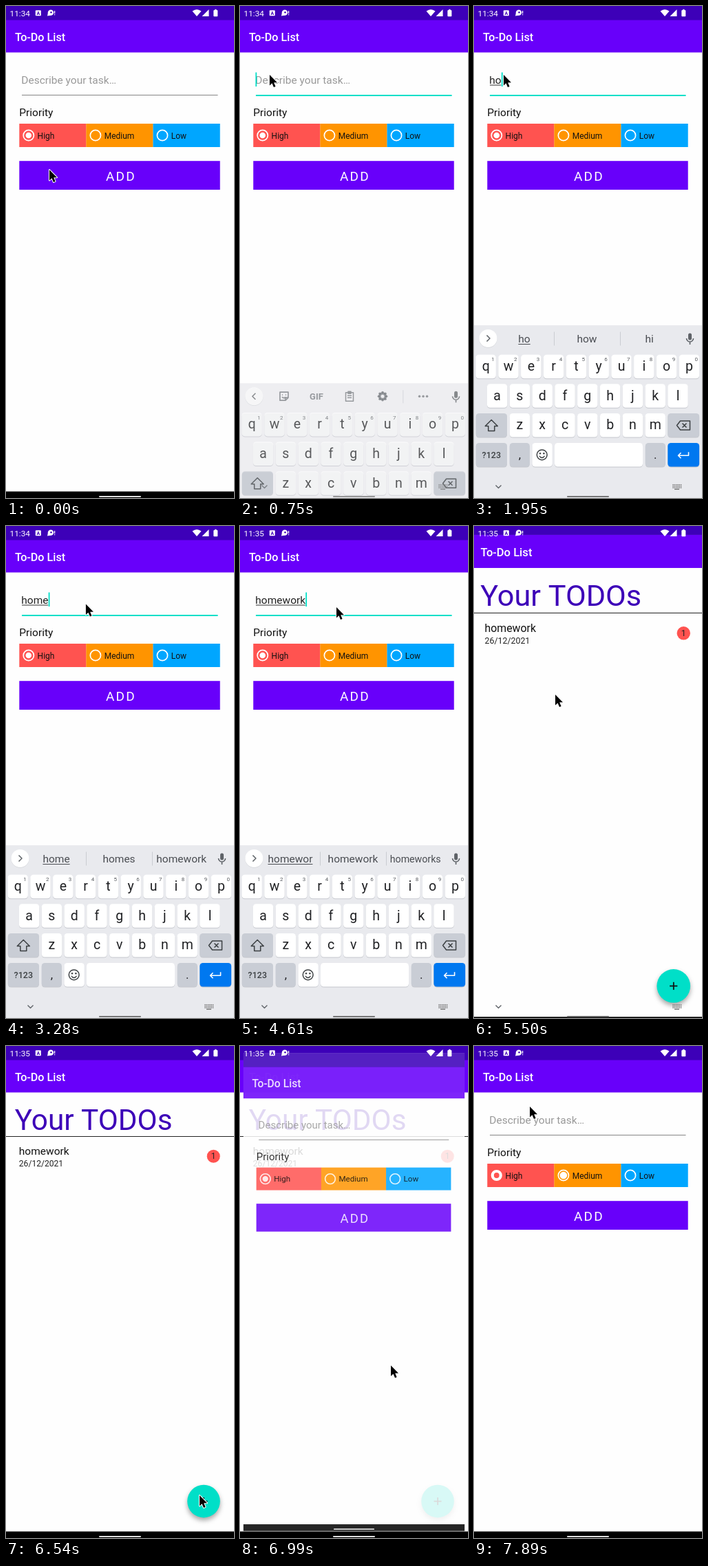
Recreate the animation shown at these times as an HTML page with a canvas. Size 331 by 715 pixels, loop 8 s.

```html
<!DOCTYPE html>
<html lang="en">
<head>
<meta charset="utf-8">
<title>To-Do List</title>
<style>
html, body { margin: 0; width: 100%; height: 100%; overflow: hidden; background: #fefefe; }
canvas { display: block; width: 331px; height: 715px; }
</style>
</head>
<body>
<canvas id="stage"></canvas>
<script>
const W = 331, H = 715, LOOP = 8000, TICK = 148.85;
const PURPLE = '#6800fa', DARK = '#3d00b8', RED = '#ff5350', ORANGE = '#ff9400',
      BLUE = '#00a6ff', TEAL = '#00dfc8', INK = '#202124', GREY = '#5f6368';
const canvas = document.getElementById('stage');
const dpr = window.devicePixelRatio || 1;
canvas.width = W * dpr;
canvas.height = H * dpr;
const ctx = canvas.getContext('2d');

// ---- helpers ----
function rect(x, y, w, h, color) {
  ctx.fillStyle = color;
  ctx.fillRect(x, y, w, h);
}
function round(x, y, w, h, r, color) {
  ctx.fillStyle = color;
  ctx.beginPath();
  ctx.roundRect(x, y, w, h, r);
  ctx.fill();
}
function disc(x, y, r, color) {
  ctx.fillStyle = color;
  ctx.beginPath();
  ctx.arc(x, y, r, 0, 7);
  ctx.fill();
}
function ring(x, y, r, color, width) {
  ctx.strokeStyle = color;
  ctx.lineWidth = width;
  ctx.beginPath();
  ctx.arc(x, y, r, 0, 7);
  ctx.stroke();
}
function icon(x, y, d, color, width = 0) {
  const path = new Path2D(d);
  ctx.save();
  ctx.translate(x, y);
  ctx.lineJoin = 'round';
  ctx.fillStyle = ctx.strokeStyle = color;
  ctx.lineWidth = width;
  if (width) ctx.stroke(path); else ctx.fill(path);
  ctx.restore();
}
function text(str, x, y, size, color, { align = 'left', weight = 400, spacing = 0 } = {}) {
  ctx.font = `${weight} ${size}px Roboto, sans-serif`;
  ctx.letterSpacing = spacing + 'px';
  ctx.textAlign = align;
  ctx.fillStyle = color;
  ctx.fillText(str, x, y);
  return ctx.measureText(str).width;
}
function layer(alpha, scale, draw) {
  ctx.save();
  ctx.globalAlpha *= alpha;
  ctx.translate(W / 2, H / 2);
  ctx.scale(scale, scale);
  ctx.translate(-W / 2, -H / 2);
  draw();
  ctx.restore();
}
// Linear interpolation through [time, ...values] stops.
function track(stops, t) {
  if (t <= stops[0][0]) return stops[0].slice(1);
  for (let i = 1; i < stops.length; i++) {
    const a = stops[i - 1], b = stops[i];
    if (t <= b[0]) {
      const k = (t - a[0]) / (b[0] - a[0]);
      return a.slice(1).map((v, j) => v + (b[j + 1] - v) * k);
    }
  }
  return stops.at(-1).slice(1);
}
// Latest entry whose time has come.
const latest = (steps, t) => steps.findLast(s => s[0] <= t);

// ---- timeline ----
const MOUSE = [[60, 63, 238], [450, 43, 100], [2835, 43, 100], [3420, 140, 118],
  [4620, 140, 118], [5200, 118, 245], [5510, 118, 245], [6390, 281, 651], [6540, 281, 653],
  [6700, 281, 653], [7440, 126, 181], [7600, 126, 181], [7889, 81, 88]];
const KEYBOARD = [[450, 251, 0], [600, 190, .35], [750, 80, .75], [900, 22, .93], [1050, 0, 1]];
const TYPED = [[0, ''], [1300, 'h'], [1600, 'ho'], [2050, 'hom'], [2350, 'home'],
  [3680, 'homew'], [4130, 'homewo'], [4280, 'homewor'], [4570, 'homework']];
const SUGGESTED = [[0], [1300, 'h', 'hi', 'he'], [1600, 'ho', 'how', 'hi'],
  [2200, 'hom', 'home', 'how'], [2500, 'home', 'homes', 'homework'],
  [3680, 'homew', 'homework', 'home'], [4280, 'homewo', 'homework', 'home'],
  [4430, 'homewor', 'homework', 'homeworks'], [4720, 'homework', 'homeworks', 'homeworker']];

// ---- screens ----
function frameOfScreen() {
  rect(0, 0, W, H, '#fefefe');
  rect(0, 20, W, 47.5, PURPLE);
  rect(0, 0, W, 20.5, DARK);
  text('To-Do List', 13, 50.7, 16.2, '#fff', { weight: 500 });
}
function blackNav() {
  rect(0, 705.5, W, 10, '#000');
  round(135, 712, 61, 1.7, 1, '#fff');
}
function radio(x, label, color, ringRadius, ringWidth, dot) {
  rect(x, 171, 97.2, 34, color);
  ring(x + 13.5, 188, ringRadius, '#fff', ringWidth);
  if (dot) disc(x + 13.5, 188, dot, '#fff');
  text(label, x + 26.3, 192.5, 12, '#111');
}
function addScreen(t, typed, focused) {
  frameOfScreen();
  if (focused) rect(23, 129, 284.5, 2, TEAL);
  else rect(23, 129, 284.5, 1, '#858585');
  let caret = 22.5;
  if (typed) {
    const width = text(typed, 22.3, 112.5, 15.5, '#222');
    rect(23, 114.5, width - 1, 1, '#333');
    caret += width;
  } else {
    text('Describe your task…', 22.3, 112.5, 15.5, '#999');
  }
  if (focused) rect(caret, 96.5, 1.8, 20.5, TEAL);
  text('Priority', 19.3, 160.3, 15.5, '#111');
  const switching = t > 7850;
  if (switching) radio(19.3, 'High', RED, 6, 4.2, 0);
  else radio(19.3, 'High', RED, 7.6, 1.7, 4.3);
  radio(116.4, 'Medium', ORANGE, 7.6, 1.7, switching ? 5.3 : 0);
  radio(213.5, 'Low', BLUE, 7.6, 1.7, 0);
  rect(19.3, 225.2, 291.4, 41.8, PURPLE);
  text('ADD', 145, 253.8, 19, '#fff', { spacing: 2.2 });
}
function listScreen() {
  frameOfScreen();
  text('Your TODOs', 12.7, 121.8, 42.3, DARK);
  rect(0, 131, W, 1, '#222');
  text('homework', 18.8, 158, 15.5, '#111');
  text('26/12/2021', 18.8, 175.3, 12.1, '#222');
  disc(301.2, 160.2, 9.5, RED);
  text('1', 301.2, 164.4, 12, '#222', { align: 'center' });
  ctx.save();
  ctx.shadowColor = 'rgba(0,0,0,.35)';
  ctx.shadowBlur = 7 * dpr;
  ctx.shadowOffsetY = 4 * dpr;
  disc(287, 661.6, 23.8, TEAL);
  ctx.restore();
  rect(281.5, 660.8, 11, 1.7, '#111');
  rect(286.2, 656.1, 1.7, 11, '#111');
  blackNav();
}

// ---- keyboard ----
function key(x, y, w, color) {
  round(x, y + 1, w, 34.5, 4.5, '#c6c8ce');
  round(x, y, w, 34.5, 4.5, color);
}
function letters(row, firstCenter, y) {
  [...row].forEach((ch, i) => {
    const x = firstCenter + i * 32.8;
    key(x - 14.7, y, 29.4, '#fff');
    text(ch, x, y + 23.3, 19.5, INK, { align: 'center' });
  });
}
function mic() {
  round(311, 475.5, 5, 10, 2.5, GREY);
  icon(313.5, 483, 'M-5 0a5 5 0 0 0 10 0M0 5V9', GREY, 1.6);
}
function toolbar() {
  icon(64, 483, 'M-6-6H6V2L2 6H-6ZM2 6V2H6M-3-2H-2M2-2H3M-3 1Q0 4 2 1', '#777b80', 1.7);
  text('GIF', 111, 487.7, 13, '#777b80', { align: 'center', weight: 700 });
  icon(159, 483, 'M-5.5-5.5H5.5V7H-5.5ZM-2-7H2V-4H-2ZM-3-1H3M-3 2H3', '#777b80', 1.5);
  for (let i = 0; i < 8; i++) {
    const a = i * Math.PI / 4;
    disc(207 + 5.6 * Math.cos(a), 483 + 5.6 * Math.sin(a), 1.8, '#777b80');
  }
  ring(207, 483, 4.2, '#777b80', 3.4);
  rect(236.3, 474, 1, 19, '#cdd0d5');
  for (const x of [260.5, 266, 271.5]) disc(x, 483, 1.7, '#777b80');
}
function suggestions(words) {
  rect(116, 473.5, 1, 20, '#caccd1');
  rect(212, 473.5, 1, 20, '#caccd1');
  words.forEach((word, i) => {
    const x = [73, 164, 254.7][i];
    const width = text(word, x, 489, word.length > 8 ? 14.2 : 15.5, '#4a4d52', { align: 'center' });
    if (!i) rect(x - width / 2, 491, width, 1, '#4a4d52');
  });
}
function keyboard(words) {
  const mod = '#c9cdd5';
  rect(0, 464, W, 330, '#e9eaee');
  disc(20.5, 483.8, 13, '#d4d6da');
  disc(20.5, 483, 13, '#fff');
  icon(20.5, 483, words.length ? 'M-2-4.5 2.5 0-2 4.5' : 'M2-4.5-2.5 0 2 4.5', GREY, 1.5);
  if (words.length) suggestions(words); else toolbar();
  mic();
  letters('qwertyuiop', 17.2, 506.7);
  [...'1234567890'].forEach((d, i) =>
    text(d, 27.5 + i * 32.8, 516.3, 8, '#55585d', { align: 'center' }));
  letters('asdfghjkl', 33.6, 549.3);
  letters('zxcvbnm', 66.4, 592);
  key(2.8, 592, 45.2, mod);
  icon(25.3, 609.5, 'M0-8 9 1H4.5V8H-4.5V1H-9Z', '#3c4043', 1.5);
  key(281.3, 592, 45.8, mod);
  icon(304.5, 609.5, 'M-10 0-5-6.5H9V6.5H-5ZM-2-3 4 3M4-3-2 3', '#3c4043', 1.5);
  key(2.8, 635, 45.2, mod);
  text('?123', 25.3, 657, 12.5, '#3c4043', { align: 'center', weight: 500 });
  key(51.8, 635, 29, mod);
  text(',', 66.3, 658, 17, INK, { align: 'center' });
  key(84.4, 635, 29.4, '#fff');
  ring(98.7, 652.3, 7.4, '#3c4043', 1.5);
  disc(96, 650.2, 1.2, '#3c4043');
  disc(101.4, 650.2, 1.2, '#3c4043');
  icon(98.7, 652.3, 'M-3.8 1.5Q0 7 3.8 1.5', '#3c4043', 1.4);
  key(117, 635, 128, '#fff');
  key(248.8, 635, 29, mod);
  text('.', 263.3, 658, 17, INK, { align: 'center' });
  key(281.3, 635, 45.8, '#0078f0');
  icon(304, 652.3, 'M7.5-4V1H-7M-3.5-3-7.5 1-3.5 5', '#fff', 1.6);
}
function keyboardNav() {
  icon(35.5, 698.5, 'M-4-2 0 2 4-2', GREY, 1.4);
  for (let row = 0; row < 3; row++)
    for (let col = 0; col < 6; col++) rect(288.3 + col * 2.3, 695 + row * 2.2, 1.5, 1.4, '#777');
  rect(291, 701.6, 7, 1.4, '#777');
  round(135, 712, 61, 1.7, 1, '#666');
}

// ---- overlays ----
function statusIcons(t) {
  text(t < 3680 ? '11:34' : '11:35', 5.6, 14.5, 11.8, '#fff');
  round(42.8, 6.3, 8, 8, 1, '#fff');
  text('A', 46.8, 13, 7, DARK, { align: 'center', weight: 700 });
  disc(65, 9.6, 4.2, '#fff');
  icon(60, 14.5, 'M0 0 1-5 5-1Z', '#fff');
  disc(65.5, 9.3, 1.2, DARK);
  rect(70, 7, 1.2, 4, '#fff');
  rect(70, 12, 1.2, 1.2, '#fff');
  icon(277, 15, 'M0 0-6.5-7.5Q0-12.5 6.5-7.5Z', '#fff');
  icon(284.5, 15, 'M0 0H10V-10Z', '#fff');
  round(301.3, 6, 6, 9.3, 1, '#fff');
  rect(303, 4.8, 2.6, 2, '#fff');
}
function pointer(x, y) {
  const arrow = 'M0 0V15.5L3.5 12.3 6 18 8.6 16.9 6.2 11.3H11Z';
  icon(x, y, arrow, '#fff', 2);
  icon(x, y, arrow, '#000');
}

function draw(t) {
  ctx.setTransform(dpr, 0, 0, dpr, 0, 0);
  ctx.globalAlpha = 1;
  const [mx, my] = track(MOUSE, t);

  if (t < 5450) {
    const focused = t > 430;
    const [offset, alpha] = track(KEYBOARD, t);
    addScreen(t, latest(TYPED, t)[1], focused);
    if (t < 580) blackNav();
    else {
      ctx.save();
      ctx.globalAlpha = alpha;
      ctx.translate(0, offset);
      keyboard(latest(SUGGESTED, t).slice(1));
      ctx.restore();
      ctx.save();
      ctx.globalAlpha = alpha;
      keyboardNav();
      ctx.restore();
    }
    if (t > 5300) layer(.5, 1.07, listScreen);
  } else if (t < 7100) {
    const closing = t < 5600;
    layer(1, closing ? 1.0225 : 1, listScreen);
    if (closing) keyboardNav();
    if (t > 6950) layer(.85, .97, () => { addScreen(t, '', false); blackNav(); });
    else if (t > 6800) layer(.25, .9, () => { addScreen(t, '', false); blackNav(); });
  } else {
    addScreen(t, '', false);
    blackNav();
  }
  statusIcons(t);
  pointer(mx, my);
}

const start = performance.now();
function loop() {
  const t = (performance.now() - start) % LOOP;
  draw(Math.floor((t + 16) / TICK) * TICK);
  requestAnimationFrame(loop);
}
loop();
</script>
</body>
</html>
```
